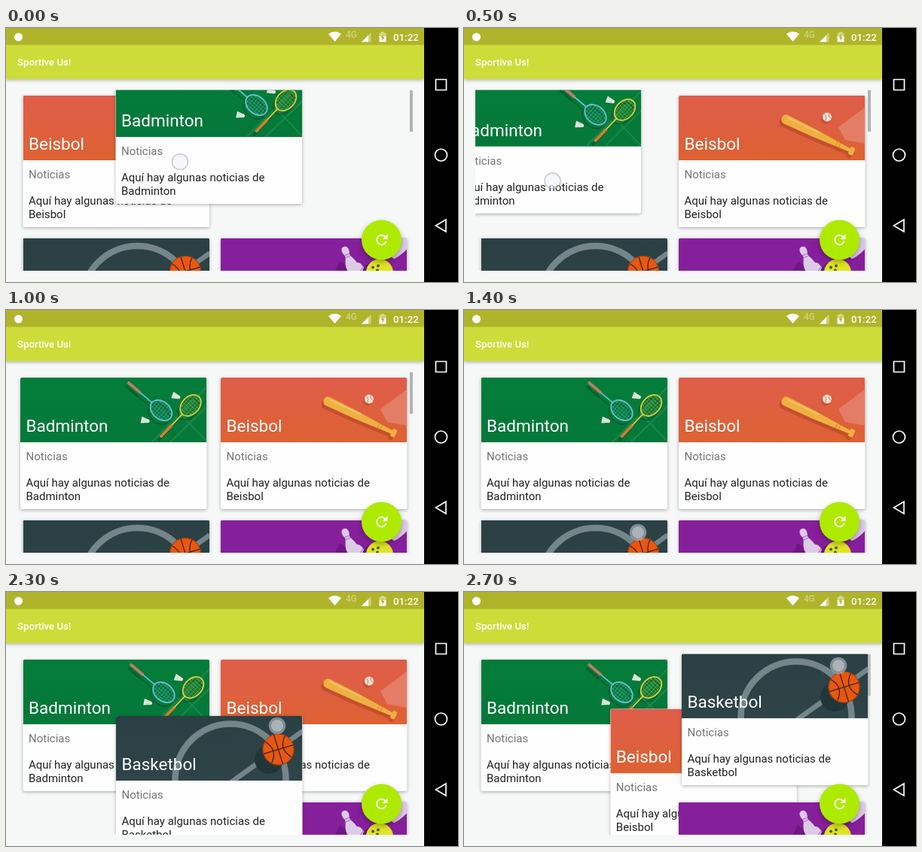
Recreate the animation shown at these times as an HTML page with a canvas. Size 600 by 338 pixels, loop 2800 ms.

```html
<!DOCTYPE html>
<html lang="es">
<head>
<meta charset="utf-8">
<style>
html, body { margin: 0; width: 100%; height: 100%; overflow: hidden; background: #000; }
canvas { display: block; }
</style>
</head>
<body>
<canvas width="600" height="338"></canvas>
<script>
const ctx = document.querySelector('canvas').getContext('2d');
const LOOP = 2800, STEP = 100;
const LEFT = 22.5, RIGHT = 285, ROW1 = 90, ROW2 = 279.5, CARD_W = 247.5, CARD_H = 175, ART_H = 86;

// Keys: [time, x, y]
const badmintonPath = [[0, 145.5, 59], [300, -7, 59], [400, -13, 62], [700, -11.5, 91.5], [800, -10, 92.5], [900, 8, 91], [1000, 19, 90], [1100, LEFT, ROW1]];
const basketPath = [[1800, LEFT, ROW2], [1900, 23, 278.5], [2100, 27.5, 272.5], [2200, 78, 226], [2400, 214, 104], [2500, 252, 89], [2700, 289, 82]];
const firstTouch = [[0, 231, 178], [300, 117, 185], [700, 118, 222], [800, 119, 223]];
const secondTouch = [[1800, 231, 296], [2100, 238, 286], [2200, 290, 240], [2400, 430, 116], [2500, 466, 101], [2700, 497, 98]];

const clamp = v => Math.min(1, Math.max(0, v));
const mix = (a, b, u) => a + (b - a) * u;
const ease = u => (1 - Math.cos(Math.PI * clamp(u))) / 2;

function along(keys, t) {
  const i = keys.findIndex(k => k[0] >= t);
  if (i < 0) return keys.at(-1).slice(1);
  if (i === 0) return keys[0].slice(1);
  const a = keys[i - 1], b = keys[i], u = (t - a[0]) / (b[0] - a[0]);
  return [mix(a[1], b[1], u), mix(a[2], b[2], u)];
}

function rect(x, y, w, h, color) {
  ctx.fillStyle = color;
  ctx.fillRect(x, y, w, h);
}
function fill(d, color) {
  ctx.fillStyle = color;
  ctx.fill(new Path2D(d));
}
function line(d, color, width = 1) {
  ctx.strokeStyle = color;
  ctx.lineWidth = width;
  ctx.stroke(new Path2D(d));
}
function disc(x, y, r, color, stroke, width = 1) {
  ctx.beginPath();
  ctx.arc(x, y, r, 0, 7);
  if (color) { ctx.fillStyle = color; ctx.fill(); }
  if (stroke) { ctx.strokeStyle = stroke; ctx.lineWidth = width; ctx.stroke(); }
}
function text(s, x, y, size, color, weight = 400) {
  ctx.font = `${weight} ${size}px Roboto, sans-serif`;
  ctx.fillStyle = color;
  ctx.fillText(s, x, y);
}
function placed(x, y, angle, scale, draw) {
  ctx.save();
  ctx.translate(x, y);
  ctx.rotate(angle);
  ctx.scale(scale, scale);
  draw();
  ctx.restore();
}
function shadow(blur, dy, alpha) {
  ctx.shadowColor = `rgba(0,0,0,${alpha})`;
  ctx.shadowBlur = blur;
  ctx.shadowOffsetY = dy;
}
function backdrop(top, bottom) {
  const g = ctx.createLinearGradient(0, 0, 0, ART_H);
  g.addColorStop(0, top);
  g.addColorStop(1, bottom);
  rect(0, 0, CARD_W, ART_H, g);
}

// Head is centred at the local origin, handle points to +x.
function racket(x, y, angle, frame, mesh, handle) {
  const head = new Path2D();
  head.ellipse(0, 0, 16, 11.5, 0, 0, 7);
  const outline = color => {
    ctx.strokeStyle = color;
    ctx.lineWidth = 1.8;
    ctx.stroke(head);
    line('M16 0H37', color, 1.8);
    line('M36 0H58', color, 3.4);
  };
  placed(x - 3, y + 5, angle, 1, () => outline('rgba(0,50,25,.35)'));
  placed(x, y, angle, 1, () => {
    ctx.save();
    ctx.clip(head);
    for (let i = -16; i <= 16; i += 4) {
      line(`M${i} -12V12`, mesh, .7);
      line(`M-18 ${i}H18`, mesh, .7);
    }
    ctx.restore();
    outline(frame);
    line('M36 0H58', handle, 3.4);
  });
}
function shuttle(x, y, angle) {
  placed(x, y, angle, .9, () => {
    fill('M-5 -5L5 -2.5V2.5L-5 5Z', '#e3ebdf');
    disc(5, 0, 2.5, '#f6f2dc');
    line('M-4 -2L4 -1M-4 2L4 1', '#b5c7b4', .7);
  });
}

function badmintonArt() {
  backdrop('#047d3a', '#04783a');
  line('M174 86L248 12M199 86L248 38M214 50L248 85', '#1f874b', 1.8);
  racket(187, 43.5, -2.44, '#68bfd2', 'rgba(104,191,210,.6)', '#ce7562');
  racket(226, 37, 2.33, '#e4cb3c', 'rgba(228,203,60,.55)', '#d9772f');
  shuttle(206, 24.5, .35);
  shuttle(165, 57, .2);
}

function baseballArt() {
  backdrop('#df5d4b', '#dd6232');
  fill('M212 42L248 15V64L221 59Z', '#e47d66');
  const bat = 'M3 -6Q-2 -5 -2 0Q-2 5 3 6L42 5L92 2.2V4.5Q96 6 98 4V-4Q96 -6 92 -4.5V-2.2L42 -5Z';
  placed(136, 34, .45, 1.06, () => fill(bat, 'rgba(150,45,20,.35)'));
  placed(139, 30, .45, 1.06, () => {
    fill(bat, '#efb042');
    line('M4 -3H48', '#f7c868', 1.5);
    line('M74 -3V3M78 -3V3', '#d88b32', 1);
  });
  disc(195, 31.5, 6, 'rgba(150,45,20,.3)');
  disc(197, 28.5, 6, '#f3e4d6');
  line('M193 24.5Q197.5 27.5 194.5 33.5M199.5 23.5Q197.5 27.5 202.5 30.5', '#d96a50', 1);
}

function basketArt() {
  backdrop('#2a4044', '#2e4447');
  disc(152, 84, 73.5, null, '#75868a', 8.5);
  line('M153 88L248 20', '#75868a', 6.5);
  disc(203, 58, 19, '#22363a');
  disc(215.5, 44.5, 21, '#e9570f');
  placed(215.5, 44.5, -.3, 1, () => {
    line('M-21 0H21M0 -21V21M-14 -15Q0 0 -14 15M14 -15Q0 0 14 15', '#3b241c', 1.3);
  });
  disc(215.5, 44.5, 20.5, null, '#8f3b16', 1);
}

function pin(x, y, angle) {
  placed(x, y, angle, 1.12, () => {
    fill('M0 -13C5 -13 5 -7 3 -3C2 1 8 6 7 14C6 23 4 28 3 30H-3C-4 28 -6 23 -7 14C-8 6 -2 1 -3 -3C-5 -7 -5 -13 0 -13Z', '#dccbe7');
    line('M-3 -3H3M-3 0H3', '#b283c6', 1.3);
  });
}
function bowlingArt() {
  backdrop('#861f9b', '#861f9b');
  fill('M158 31L178 43L170 58L150 47Z', '#701784');
  pin(169, 25, -.4);
  pin(190, 43, -.95);
  pin(249, 0, .7);
  disc(206, 50, 19, '#67177a');
  disc(211, 46, 18, '#dfe422');
  disc(202, 39, 2, '#4f5a16');
  disc(209, 37, 2, '#4f5a16');
  disc(208, 43, 2, '#4f5a16');
}

function card(name, art, [x, y]) {
  ctx.save();
  ctx.translate(x, y);
  const box = new Path2D();
  box.roundRect(0, 0, CARD_W, CARD_H, 2);
  ctx.save();
  shadow(4, 1.2, .3);
  ctx.fillStyle = '#fdfefd';
  ctx.fill(box);
  ctx.restore();
  ctx.save();
  ctx.clip(box);
  ctx.beginPath();
  ctx.rect(0, 0, CARD_W, ART_H);
  ctx.clip();
  art();
  ctx.restore();
  text(name, 7.5, 72, 22.5, '#fff');
  text('Noticias', 7.5, 110, 15, '#757575');
  text('Aquí hay algunas noticias de', 7.5, 145, 15, '#212121');
  text(name, 7.5, 163, 15, '#212121');
  ctx.restore();
}

function bars() {
  ctx.save();
  shadow(4, 1.5, .25);
  rect(0, 22, 555, 46, '#cddc39');
  ctx.restore();
  rect(0, 0, 555, 22.5, '#afb42b');
  text('Sportive Us!', 15, 50, 13.2, '#fff', 500);
  disc(16.5, 12, 5.5, '#fff');
  fill('M428 8Q436.5 1.5 445 8L436.5 18Z', '#fff');
  text('4G', 451, 12.5, 12, 'rgba(255,255,255,.4)', 500);
  fill('M484.5 6V18.5H472Z', 'rgba(255,255,255,.4)');
  fill('M481 9.5V18.5H472Z', '#fff');
  fill('M498 5H502V6.5H504.5V11H495.5V6.5H498Z', 'rgba(255,255,255,.45)');
  rect(495.5, 11, 9, 7.5, '#fff');
  fill('M501 8L497.5 13H499.5V17L502.5 12H500.5Z', '#afb42b');
  text('01:22', 514, 16.5, 13.3, '#fff', 500);

  rect(555, 0, 45, 338, '#000');
  line('M570.5 68.5H584.5V82.5H570.5Z', '#fff', 1.7);
  disc(577.5, 169, 8, null, '#fff', 1.7);
  line('M570.5 263L584 255V271Z', '#fff', 1.7);
}

function refreshButton() {
  ctx.save();
  shadow(7, 3, .3);
  disc(498.5, 282, 26.5, '#aeea00');
  ctx.restore();
  ctx.beginPath();
  ctx.arc(498.5, 282, 6.3, .35, 5.5);
  ctx.strokeStyle = '#fff';
  ctx.lineWidth = 1.8;
  ctx.stroke();
  fill('M506.5 274V281H499.5Z', '#fff');
}

function touch([x, y]) {
  disc(x, y, 10.5, 'rgba(240,242,248,.4)', 'rgba(165,170,195,.6)', 1.6);
  disc(x, y, 8, 'rgba(245,246,250,.4)');
}

function draw(t) {
  rect(0, 0, 600, 338, '#f5f8f7');
  bars();

  const swap = ease((t - 166) / 250), drop = ease((t - 2600) / 250);
  const baseball = [mix(mix(LEFT, RIGHT, swap), LEFT, drop), mix(ROW1, ROW2, drop)];
  const cards = [
    ['Beisbol', baseballArt, baseball],
    ['Bolos', bowlingArt, [RIGHT, ROW2]],
    ['Basketbol', basketArt, along(basketPath, t)],
  ];
  // A dragged card lies on top; once dropped it takes its place in the list.
  const badminton = ['Badminton', badmintonArt, along(badmintonPath, t)];
  if (t < 1200) cards.push(badminton);
  else cards.unshift(badminton);

  ctx.save();
  ctx.beginPath();
  ctx.rect(15, 82.5, 525, 240.5);
  ctx.clip();
  cards.forEach(c => card(...c));
  const bar = t < 2000 ? clamp((1300 - t) / 300) : clamp((t - 2600) / 150);
  rect(536, 82.5, 4, 55.5, `rgba(125,125,125,${bar * .55})`);
  ctx.restore();

  refreshButton();
  if (t <= 800) touch(along(firstTouch, t));
  if (t >= 1300) touch(along(secondTouch, t));
}

function tick(now) {
  draw(Math.floor(now % LOOP / STEP) * STEP);
  requestAnimationFrame(tick);
}
tick(performance.now());
</script>
</body>
</html>
```
